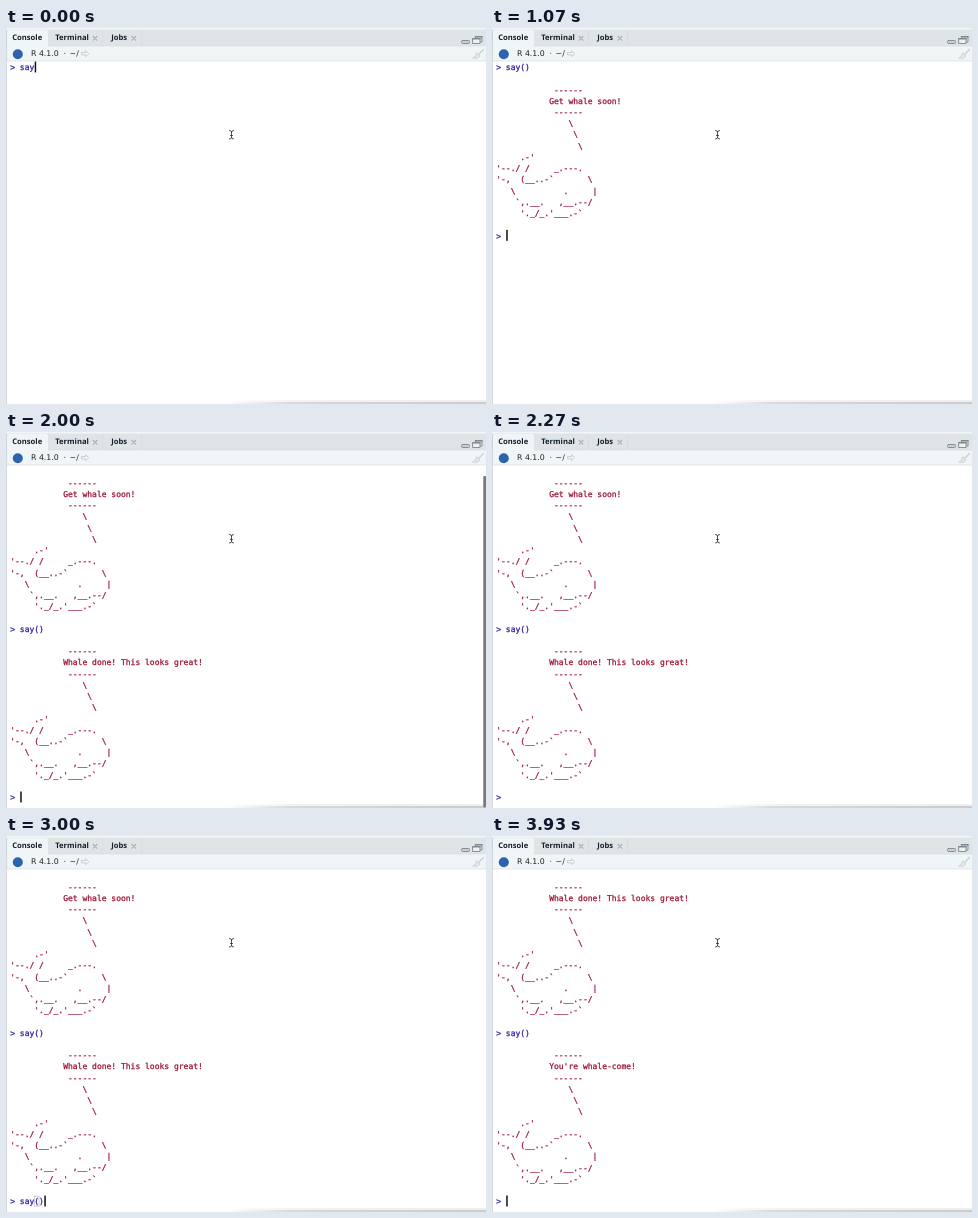
These frames come from a looping animation (480 px wide and 376 px high, 3.99 s). An HTML page:

```html
<!DOCTYPE html>
<html lang="en">
<head>
<meta charset="utf-8">
<title>Console whale</title>
<style>
  html, body { margin: 0; width: 100%; height: 100%; overflow: hidden; background: #fff; }
  svg { display: block; width: 480px; height: 376px; }
  text { white-space: pre; text-rendering: geometricPrecision; }
  .tab { font: bold 7.65px "Noto Sans", sans-serif; fill: #15202c; }
  .info { font: 7.8px "DejaVu Sans", sans-serif; fill: #222; }
  .console { font: 8px "DejaVu Sans Mono", monospace; stroke-width: .25; }
  .input { fill: #2a1c9c; stroke: #2a1c9c; }
  .output { fill: #9c1030; stroke: #9c1030; }
  .tip { font: 7.6px "Noto Sans", sans-serif; fill: #222; stroke: #222; stroke-width: .15; }
  .line { fill: none; stroke-linecap: round; stroke-linejoin: round; }
</style>
</head>
<body>
<svg viewBox="0 0 480 376">
  <defs>
    <clipPath id="pane"><rect y="33" width="480" height="343"/></clipPath>
    <linearGradient id="fadeRight">
      <stop offset="0" stop-color="#888" stop-opacity="0"/>
      <stop offset=".25" stop-color="#888" stop-opacity=".25"/>
      <stop offset="1" stop-color="#888" stop-opacity=".35"/>
    </linearGradient>
  </defs>
  <rect width="480" height="376" fill="#fff"/>

  <g clip-path="url(#pane)">
    <g id="console" class="console"></g>
  </g>
  <rect id="thumb" x="477.3" width="2.7" rx="1" fill="#777"/>

  <!-- tab bar and toolbar -->
  <rect width="480" height="18" fill="#dfe5e7"/>
  <rect width="480" height="1.5" fill="#f3f5f6"/>
  <path d="M1 18V4q0-2 2-2h37q2 0 2 2v14z" fill="#f0f5f7"/>
  <path d="M96.5 3v15M135.5 3v15" stroke="#d3d9dc" stroke-width=".6"/>
  <rect y="18" width="480" height="15" fill="#f0f5f8"/>
  <path d="M42 18H480M0 33H480" stroke="#d6dcdf" stroke-width=".7"/>
  <path d="M.4 2V376" stroke="#c6cbce" stroke-width=".8"/>
  <g class="tab">
    <text x="6.2" y="12.3">Console</text>
    <text x="49.2" y="12.3">Terminal</text>
    <text x="105.2" y="12.3">Jobs</text>
  </g>
  <path class="line" d="M87.3 8.5l3.6 3.6m0-3.6l-3.6 3.6M126 8.5l3.6 3.6m0-3.6l-3.6 3.6" stroke="#a9afb3" stroke-width="1.2"/>
  <circle cx="11.8" cy="26.2" r="5" fill="#2b64ad"/>
  <g class="info">
    <text x="25" y="28.3">R 4.1.0</text>
    <text x="57.4" y="28.3">·</text>
    <text x="63.6" y="28.3">~/</text>
  </g>
  <path class="line" d="M76 24.5h3.6v-1.8l3.2 3-3.2 3v-1.8H76z" stroke="#b9bfc3" stroke-width=".7"/>
  <g class="line" stroke="#7d878d" stroke-width=".9">
    <rect x="455.5" y="12.5" width="8" height="3" rx="1" fill="#c9d0d4"/>
    <path d="M469.5 10V8.5h6.5v5.5h-1.5"/>
    <rect x="467" y="10.5" width="7" height="5" fill="#eef1f3"/>
    <path d="M469.5 8.7H476M467 10.8h7" stroke-width="1.5"/>
  </g>
  <g class="line" stroke="#c9cdd0">
    <path d="M477.5 21.5l-4.5 4.5" stroke-width="1.2"/>
    <path d="M471 25l3 3-3 2.5-4.5-.5 2.5-1.5z" stroke-width=".8" fill="#e4e7e9"/>
  </g>

  <!-- bottom shadow and mouse pointer -->
  <rect x="216" y="372" width="264" height="4" fill="url(#fadeRight)" opacity=".4"/>
  <rect x="222" y="374" width="258" height="2" fill="url(#fadeRight)"/>
  <path class="line" d="M223.5 102.5q2 0 2 1.5v5.5q0 1.5-2 1.5m4-8.5q-2 0-2 1.5m2 7q-2 0-2-1.500M224.5 107.5h2" stroke="#222" stroke-width=".8"/>
</svg>

<script>
const LOOP = 3990, LEFT = 4.2, CHAR = 4.816, ROW = 11.23, BASE = 42.1, RUN_ROWS = 15;
const PANE_BOTTOM = 375.5, PANE_HEIGHT = 342;

// keys: times of s, sa, say, the bracket pair, the hint, the closing bracket, Enter
const runs = [
  { said: "Get whale soon!", keys: [0, 0, 0, 270, 330, 470, 600] },
  { said: "Whale done! This looks great!", keys: [1270, 1330, 1470, 1600, 1670, 1730, 1870] },
  { said: "You're whale-come!", keys: [2600, 2670, 2800, 2930, 2930, 3000, 3400] },
];
const typed = ["", "s", "sa", "say", "say()", "say()", "say()", "say()"];
const caretColumn = [2, 3, 4, 5, 6, 6, 7, 7];
const caretOff = [[600, 730], [930, 1070], [1870, 2000], [2200, 2400],
                  [3130, 3270], [3400, 3530], [3730, 3930]];
const scrolls = [{ from: 1930, by: 10.8 }, { from: 3470, by: 10.8 + RUN_ROWS * ROW }];

const whale = String.raw`
               \
                \
                 \
     .-'
'--./ /     _.---.
'-,  (__..-~       \
   \          .     |
    ~,.__.   ,__.--/
     '._/_.'___.-~`.replaceAll("~", "`").split("\n").slice(1);

const consoleGroup = document.getElementById("console");
const thumb = document.getElementById("thumb");
const x = column => LEFT + column * CHAR;
const y = row => BASE + row * ROW;

function add(tag, attributes, parent = consoleGroup, content = "") {
  const node = document.createElementNS("http://www.w3.org/2000/svg", tag);
  for (const name in attributes) node.setAttribute(name, attributes[name]);
  node.textContent = content;
  return parent.appendChild(node);
}
const set = (node, name, value) => node.setAttribute(name, value);
const show = (node, visible) => set(node, "visibility", visible ? "visible" : "hidden");

runs.forEach((run, i) => {
  const top = i * RUN_ROWS, dashes = " ".repeat(12) + "------";
  run.output = add("g", { class: "output" });
  [dashes, " ".repeat(11) + run.said, dashes, ...whale].forEach((line, n) =>
    add("text", { x: LEFT, y: y(top + 2 + n) }, run.output, line));
});
const prompts = [0, 1, 2, 3].map(i =>
  add("text", { class: "input", x: LEFT, y: y(i * RUN_ROWS) }));
const bracket = add("rect", { x: x(5), width: CHAR, height: 10, fill: "none", stroke: "#b9b9c4", "stroke-width": .7 });
const caret = add("rect", { width: 1.5, height: 11, fill: "#111" });
const tip = add("g", {});
add("rect", { x: 30.5, y: -28.2, width: 39.5, height: 13.5, rx: 1, fill: "#000", opacity: .15 }, tip);
add("rect", { x: 29.3, y: -29.2, width: 39, height: 12.6, fill: "#fbfbc6", stroke: "#b5b59a", "stroke-width": .7 }, tip);
add("text", { class: "tip", x: 31, y: -20.1 }, tip, "say(what)");

function draw(t) {
  const promptTime = i => i ? runs[i - 1].keys[6] + 130 : 0;
  const current = prompts.findLastIndex((_, i) => t >= promptTime(i));
  let step = 0;

  prompts.forEach((prompt, i) => {
    const pressed = i < runs.length ? runs[i].keys.filter(key => t >= key).length : 0;
    if (i === current) step = pressed;
    prompt.textContent = i <= current ? "> " + typed[pressed] : "";
  });
  runs.forEach(run => show(run.output, t >= run.keys[6] + 60));

  const base = y(current * RUN_ROWS);
  set(caret, "x", x(caretColumn[step]) + .4);
  set(caret, "y", base - 8.7);
  show(caret, !caretOff.some(([from, to]) => t >= from && t < to));
  set(bracket, "y", base - 8);
  show(bracket, step >= 6);
  set(tip, "transform", `translate(0 ${base})`);
  show(tip, step === 5);

  const scroll = scrolls.findLast(s => t >= s.from) || { from: -LOOP, by: 0 };
  set(consoleGroup, "transform", `translate(0 ${-scroll.by})`);
  const height = PANE_HEIGHT ** 2 / (PANE_HEIGHT + scroll.by);
  const age = t - scroll.from;
  set(thumb, "y", PANE_BOTTOM - height);
  set(thumb, "height", height);
  set(thumb, "opacity", age < 260 ? 1 : age < 330 ? .45 : 0);
}

function tick() {
  draw(performance.now() % LOOP);
  requestAnimationFrame(tick);
}
tick();
</script>
</body>
</html>
```
